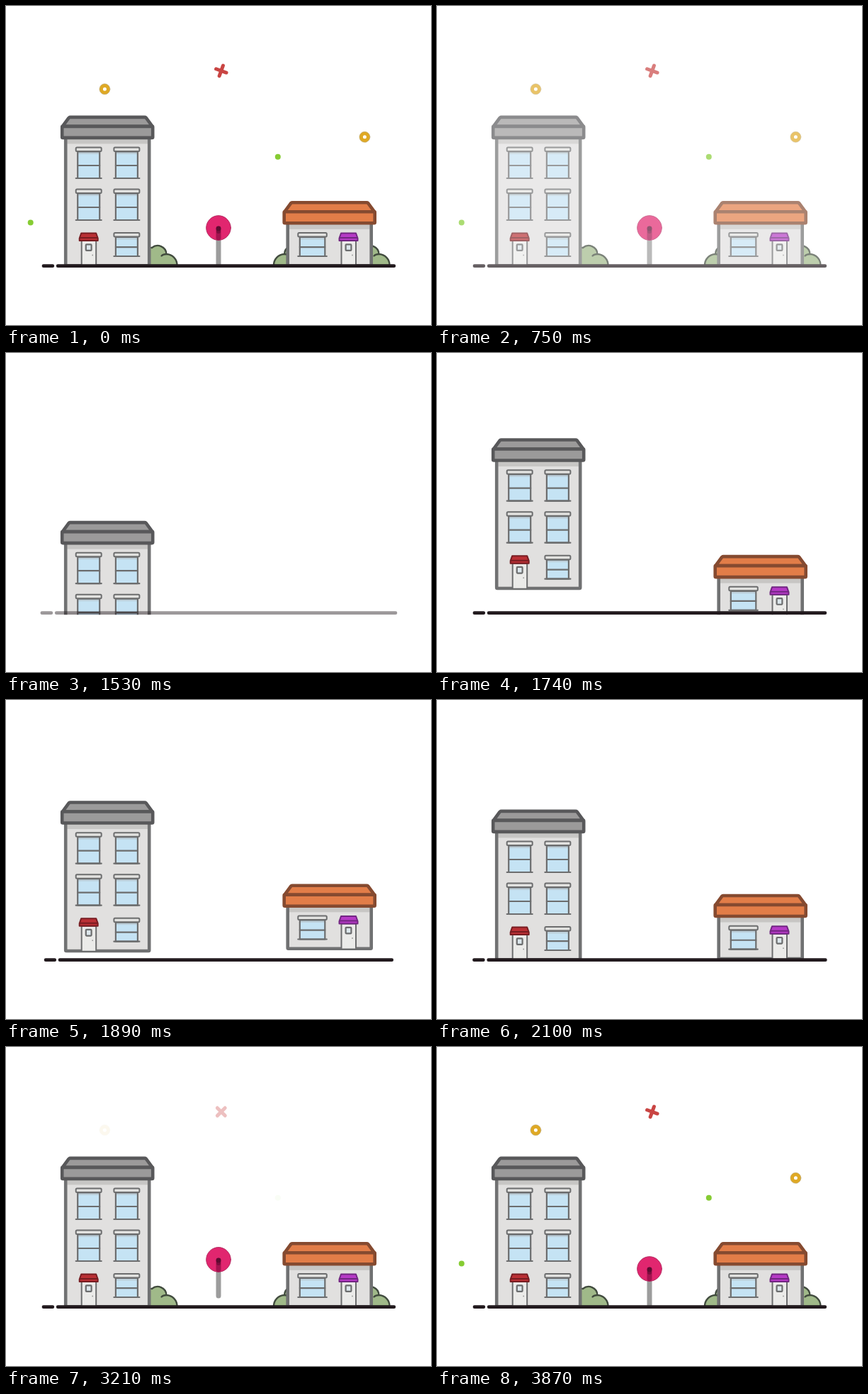
An HTML page for the animation above (3.93 s loop, 600 px wide and 450 px high).

```html
<!DOCTYPE html>
<html lang="en">
<head>
<meta charset="utf-8">
<title>Little street</title>
<style>
html, body { margin: 0; width: 100%; height: 100%; overflow: hidden; background: #fff; }
svg { display: block; width: 600px; height: 450px; }
</style>
</head>
<body>
<svg viewBox="0 0 600 450" fill="none" stroke-linejoin="round" stroke-linecap="round">
  <defs>
    <clipPath id="above"><rect width="600" height="369.3"/></clipPath>
    <g id="bush" stroke="#414b3e" stroke-width="2.3">
      <path fill="#a0b989" d="M196 366V350A9 9 0 0 1 206 341A12.5 12.5 0 0 1 226.5 350A15.5 15.5 0 0 1 241.5 366Z"/>
      <path d="M226.5 350Q222 350 219.5 352.5"/>
    </g>
    <g id="ring"><circle r="5" stroke="#dfa925" stroke-width="5"/><circle r="7.5" stroke="#b9a678" stroke-width=".6"/></g>
    <circle id="dot" r="4" fill="#86cc33"/>
  </defs>
  <g id="scene">
    <g clip-path="url(#above)">
      <g id="bush1"><use href="#bush"/></g>
      <g id="bush2"><use href="#bush" transform="matrix(-1 0 0 1 619.5 0)"/></g>
      <g id="bush3"><use href="#bush" x="300"/></g>
      <g id="tree">
        <path d="M300 314V364" stroke="#9c9c9c" stroke-width="7"/>
        <circle cx="300" cy="313" r="17.3" fill="#e1266f" stroke="#b52a60"/>
        <path d="M300 314V327" stroke="#a3124f" stroke-width="7"/>
        <path d="M300 314V318" stroke="#7c0d3d" stroke-width="6"/>
        <circle cx="300" cy="314" r="3.4" fill="#5c0b30"/>
      </g>
      <g id="tower"></g>
      <g id="house"></g>
    </g>
    <path id="ground" d="M53 366.7H65.8M73.2 366.7H547.8" stroke="#221a1e" stroke-width="4.8"/>
    <g id="cross"><path d="M-7.7 0H7.7M0-7.7V7.7" stroke="#c94543" stroke-width="5"/></g>
    <use id="ring1" href="#ring" x="139.4" y="117.2"/>
    <use id="ring2" href="#ring" x="506.4" y="184.8"/>
    <use id="dot1" href="#dot" x="383.8" y="212.7"/>
    <use id="dot2" href="#dot" x="34.7" y="305.4"/>
  </g>
</svg>
<script>
const LOOP = 3930;
const el = id => document.getElementById(id);
const clamp = v => Math.max(0, Math.min(1, v));
const GREY = '#6c6d6e';

const rect = (x, y, w, h, fill, stroke = 'none', width = 2.2, r = 0) =>
  `<rect x="${x}" y="${y}" width="${w}" height="${h}" rx="${r}" fill="${fill}" stroke="${stroke}" stroke-width="${width}"/>`;
const path = (d, fill, stroke, width) =>
  `<path d="${d}" fill="${fill}" stroke="${stroke}" stroke-width="${width}"/>`;

// x, y: top left corner of the lintel; w: pane width; h: pane height
const sashWindow = (x, y, w, h) =>
  rect(x + 2.5, y + 6, w, h, '#c5e3f4') +
  rect(x + 2.5, y + 6, w, 3.5, '#bccfda') +
  rect(x + 2.5, y + 6, w, h, 'none', GREY) +
  path(`M${x + 2.5} ${y + 6 + h * .52}h${w}M${x} ${y + 6 + h}h${w + 5}`, 'none', GREY, 2.2) +
  rect(x, y, w + 5, 5.5, '#e2e2e0', GREY, 2, 1.5);

const door = (x, fill, stroke) =>
  rect(x + 3.5, 331, 20.5, 36, '#ebebe9', GREY, 2) +
  rect(x + 9.6, 336.3, 7.8, 8.6, '#dce7ec', GREY, 2.2, 1) +
  `<circle cx="${x + 19}" cy="351.5" r=".9" fill="#999"/>` +
  path(`M${x + 3} 320.5h21l2.5 7v3.5h-26v-3.5zM${x + 1} 327h25`, fill, stroke, 2);

const building = (x, top, roofFill, roofLine) =>
  rect(x + 5, top + 25, 118, 186.5 - top + 155, '#e1e0df') +
  rect(x + 7, top + 30, 114, 9, '#c7c6c4') +
  rect(x + 5, top + 25, 118, 341.3 - top, 'none', '#707172', 4.6, 1) +
  path(`M${x + .5} ${top + 14.5}l9-12.2q1-.8 2-.8h105q1.2 0 2 .8l9 12.2z`, roofFill, roofLine, 4.6) +
  rect(x, top + 14.5, 128, 16, roofFill, roofLine, 4.6, 1);

el('tower').innerHTML = building(79.2, 155.4, '#9b9a9a', '#58585a') +
  [199.5, 258.5].map(y => [98.7, 152.4].map(x => sashWindow(x, y, 31, 37.5)).join('')).join('') +
  sashWindow(152.4, 320, 31, 27) + door(103.2, '#ba3035', '#781d22');
el('house').innerHTML = building(392.7, 275.8, '#e27d48', '#854a30') +
  sashWindow(412.3, 320, 35.5, 27) + door(470, '#b63ac6', '#722682');

// Remaining distance, 1 to 0, passing below zero before it settles
function back(t, start, duration) {
  const u = 1 - clamp((t - start) / duration);
  return 3.25 * u ** 3 - 2.25 * u ** 2;
}

function spring(t, start, half) {
  const a = Math.max(0, t - start) * Math.PI / half, damp = .577;
  return 1 - Math.exp(-damp * a) * (Math.cos(a) + damp * Math.sin(a));
}

// id: [start, travel]
const risers = {
  tower: [1452, 215], house: [1605, 97],
  bush1: [2130, 36], bush2: [2390, 36], bush3: [2650, 36],
  tree: [2920, 82]
};
const fades = { ground: 1410, cross: 3120, ring1: 3192, dot1: 3198, ring2: 3300, dot2: 3570 };

function draw(t) {
  const leaving = t < 1110;
  el('scene').setAttribute('opacity', leaving ? clamp((1110 - t) / 520) : 1);
  const time = leaving ? LOOP : t;
  for (const [id, [start, travel]] of Object.entries(risers)) {
    el(id).setAttribute('transform', `translate(0 ${travel * back(time, start, 540)})`);
    el(id).setAttribute('visibility', time > start ? 'visible' : 'hidden');
  }
  for (const [id, start] of Object.entries(fades))
    el(id).setAttribute('opacity', clamp((time - start) / 270));
  el('ground').setAttribute('transform',
    `translate(300.4 0) scale(${spring(time, 1388, 212)} 1) translate(-300.4 0)`);
  el('cross').setAttribute('transform',
    `translate(303.8 91.4) rotate(${20 + 25 * back(time, 3210, 400)})`);
}

const begin = performance.now();
(function frame() {
  draw((performance.now() - begin) % LOOP);
  requestAnimationFrame(frame);
})();
</script>
</body>
</html>
```
